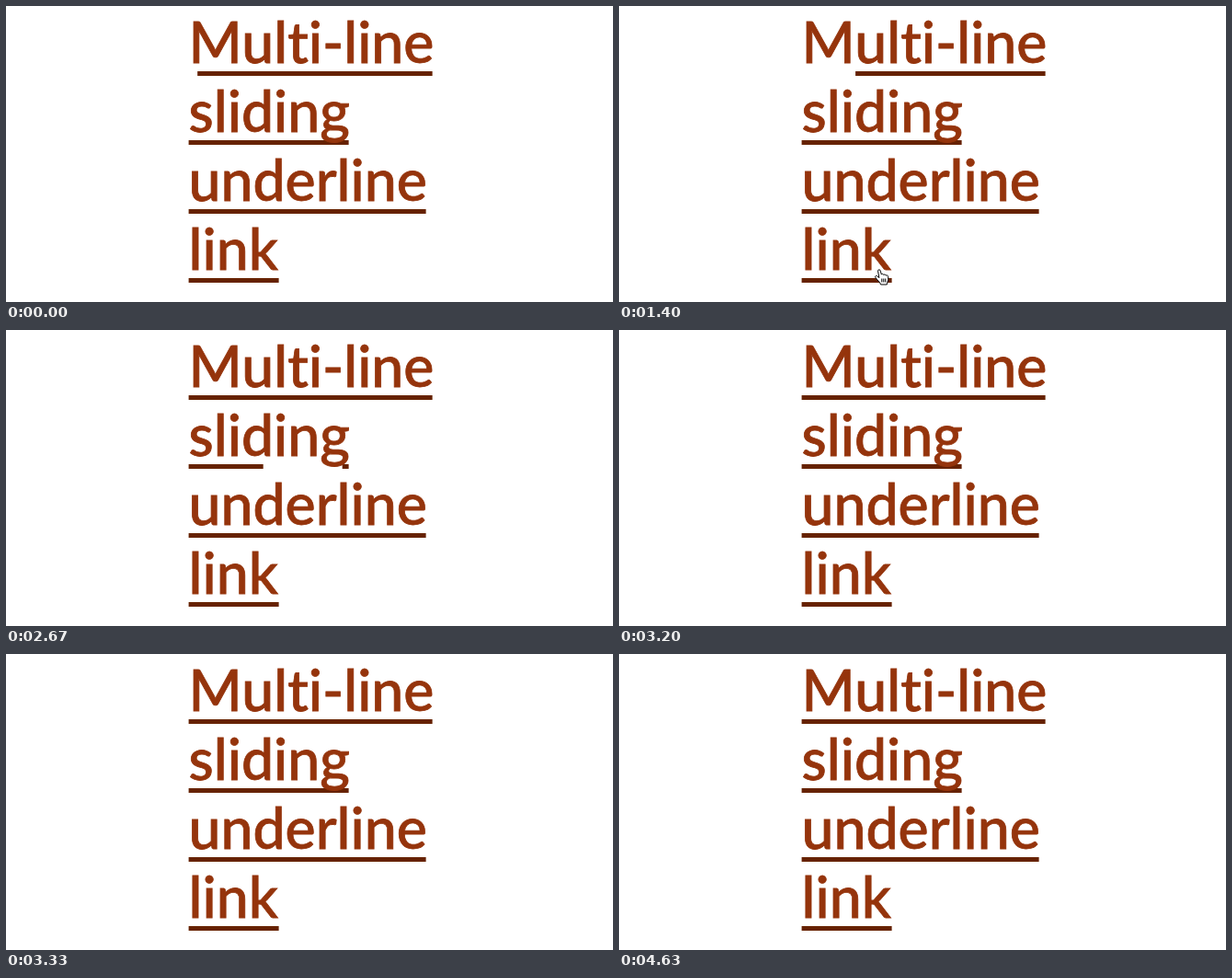
These frames come from a looping animation (660 px wide and 322 px high, 4.66 s). An HTML page with a canvas:

```html
<!DOCTYPE html>
<html lang="en">
<head>
<meta charset="utf-8">
<title>Multi-line sliding underline link</title>
<style>
  html, body { margin: 0; width: 100%; height: 100%; overflow: hidden; background: #fff; }
  canvas { display: block; }
</style>
</head>
<body>
<canvas id="stage" width="660" height="322"></canvas>
<script>
const ctx = document.getElementById('stage').getContext('2d');
const LOOP = 4660, STEP = LOOP / 140;
const LEFT = 198.6, LINE_HEIGHT = 75, GAP = 86, SLIDE = 600;
const LINES = [['Multi-line', 265], ['sliding', 174], ['underline', 258], ['link', 98]];
const TRAVEL = LINES.reduce((sum, line) => sum + line[1], GAP);
const ENTER = 1350, LEAVE = 2484, FIRST_LEAVE = -518;

// Pointer height over time
const POINTER = [[1265, 324], [ENTER, 299], [1398, 287], [1530, 279],
                 [2380, 279], [LEAVE, 302], [2560, 324]];

const HAND = new Path2D(`M-1 1.2 C-1-.6 1.7-.6 1.8 1.2 L2.8 5 C3.4 4 5 4.3 5.2 5.5
  C6 4.7 7.5 5 7.7 6.2 C8.6 5.5 10.1 6 10.2 7.6 L10.2 10.5 C10.2 12.6 9 13.2 8.8 16
  L2 16 C1.6 13.4-1.8 11.2-3.7 8.2 C-4.5 6.8-2.7 5.8-1.4 7.1 L.4 8.6 Z`);
const HAND_CREASES = new Path2D('M3.3 9.5v4M5.3 9.5v4M7.3 9.5v4');
const ARROW = new Path2D('M0 0V14L3.3 11L5.6 16.2L8 15.2L5.8 10.2H10.2Z');

// CSS "ease": cubic-bezier(.25, .1, .25, 1)
function ease(x) {
  if (x <= 0) return 0;
  if (x >= 1) return 1;
  const bezier = (s, a, b) => 3 * (1 - s) ** 2 * s * a + 3 * (1 - s) * s * s * b + s ** 3;
  let low = 0, high = 1;
  for (let i = 0; i < 30; i++) {
    const mid = (low + high) / 2;
    if (bezier(mid, .25, .25) < x) low = mid; else high = mid;
  }
  return bezier(low, .1, 1);
}

function gapEnd(t) {
  const slide = start => ease((t - start) / SLIDE);
  if (t < ENTER) return TRAVEL * (1 - slide(FIRST_LEAVE));
  return TRAVEL * (t < LEAVE ? slide(ENTER) : 1 - slide(LEAVE));
}

function drawLines(t) {
  const end = gapEnd(t), start = end - GAP;
  ctx.font = '500 62.5px Lato, sans-serif';
  ctx.letterSpacing = '-0.01px'; // any spacing turns ligatures off
  ctx.lineWidth = .8;
  ctx.strokeStyle = '#95340c';
  let offset = 0;
  LINES.forEach(([text, width], i) => {
    const y = i * LINE_HEIGHT;
    const clamp = v => Math.max(0, Math.min(width, v - offset));
    ctx.fillStyle = '#662200';
    ctx.fillRect(LEFT, y + 71, clamp(start), 5);
    ctx.fillRect(LEFT + clamp(end), y + 71, width - clamp(end), 5);
    ctx.fillStyle = '#95340c';
    ctx.fillText(text, LEFT, y + 62);
    ctx.strokeText(text, LEFT, y + 62); // slightly heavier letters
    offset += width;
  });
}

function drawPointer(t) {
  const i = POINTER.findIndex(p => p[0] > t);
  if (i < 1) return;
  const [t0, y0] = POINTER[i - 1], [t1, y1] = POINTER[i];
  const over = t >= ENTER && t < LEAVE;
  const shape = over ? HAND : ARROW;
  ctx.save();
  ctx.translate(282.5, y0 + (y1 - y0) * (t - t0) / (t1 - t0));
  ctx.fillStyle = over ? '#fff' : '#000';
  ctx.strokeStyle = over ? '#000' : '#fff';
  ctx.lineWidth = 1;
  ctx.fill(shape);
  ctx.stroke(shape);
  if (over) ctx.stroke(HAND_CREASES);
  ctx.restore();
}

function draw() {
  const t = Math.floor(performance.now() % LOOP / STEP) * STEP;
  ctx.fillStyle = '#fff';
  ctx.fillRect(0, 0, 660, 322);
  drawLines(t);
  drawPointer(t);
  requestAnimationFrame(draw);
}
draw();
</script>
</body>
</html>
```
